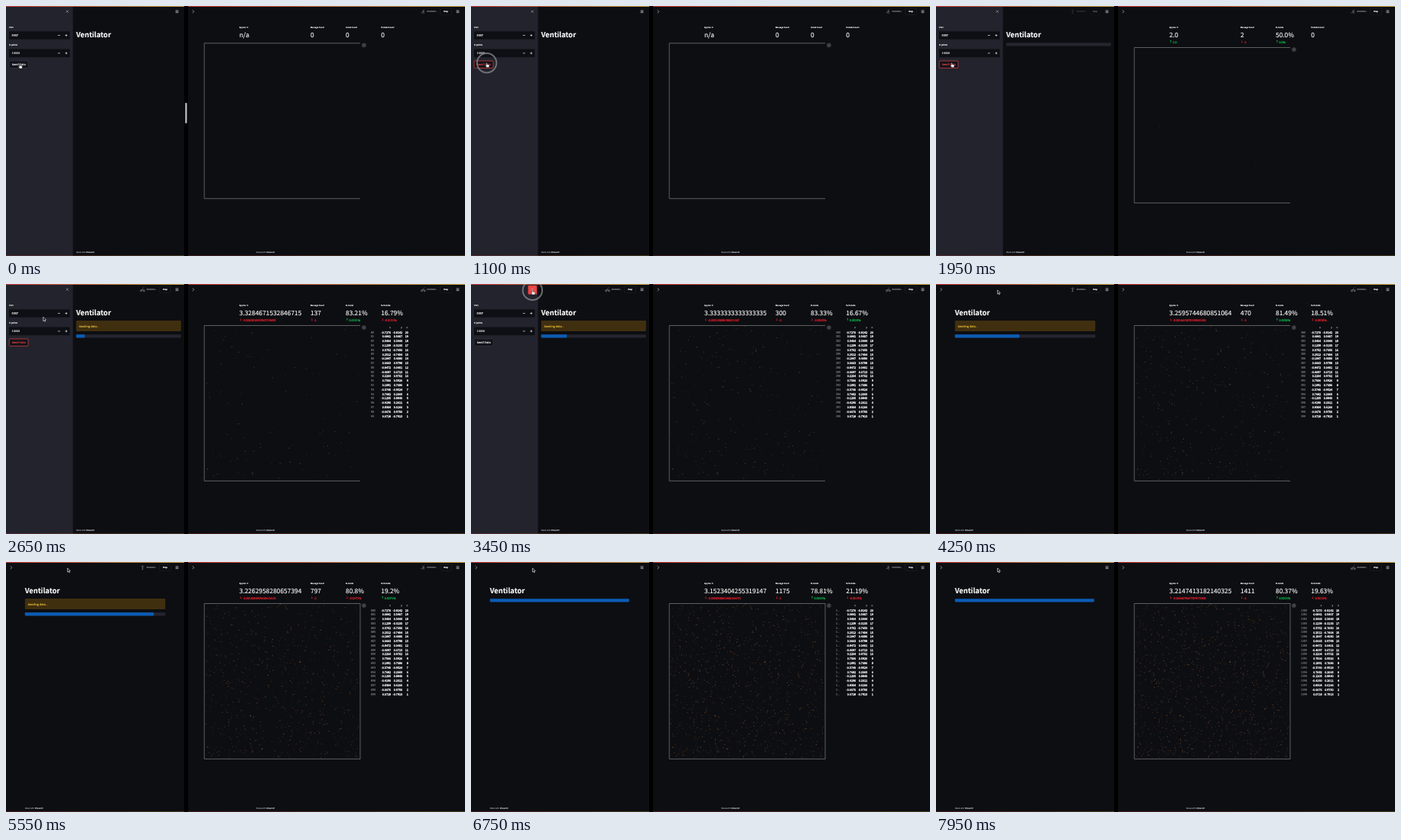
These frames come from a looping animation (600x328 px, 8000 ms). An HTML page with a canvas:

```html
<!DOCTYPE html>
<html lang="en">
<head>
<meta charset="utf-8">
<title>Ventilator</title>
<style>
  html, body { margin: 0; width: 600px; height: 328px; overflow: hidden; background: #0d0e12; }
  svg, canvas { position: absolute; display: block; }
  svg { left: 0; top: 0; }
  canvas { left: 259px; top: 54px; }
  text {
    font-family: "Noto Sans CJK JP", "Noto Sans CJK SC", "Noto Sans CJK", "Noto Sans", sans-serif;
    color: #fafafa; fill: currentColor; stroke: currentColor; stroke-width: .14;
    text-rendering: geometricPrecision; white-space: pre;
  }
  .dim { color: #85868c; }
</style>
</head>
<body>
<svg id="stage" width="600" height="328" viewBox="0 0 600 328">
  <defs>
    <linearGradient id="strip"><stop stop-color="#f04040"/><stop offset="1" stop-color="#e6c552"/></linearGradient>
  </defs>
  <rect width="600" height="328" fill="#0d0e12"/>
  <g id="main"></g>
  <g id="side"><rect width="87.5" height="328" fill="#22232c"/></g>
  <g id="bars"></g>
  <g id="right"></g>
  <g id="top"></g>
</svg>
<canvas id="dots" width="204" height="204"></canvas>
<script>
const LOOP = 8000, TICK = 50;
const $ = id => document.getElementById(id);

function add(parent, tag, attrs) {
  const el = document.createElementNS('http://www.w3.org/2000/svg', tag);
  set(el, attrs);
  return parent.appendChild(el);
}
function set(el, attrs) {
  for (const k in attrs) el.setAttribute(k, attrs[k]);
}
// Text placed by the vertical middle of its capitals
function label(parent, x, mid, size, str, attrs = {}) {
  const el = add(parent, 'text', { x, y: mid + size * .367, 'font-size': size, ...attrs });
  el.textContent = str;
  return el;
}
const line = (parent, d, width = .6, stroke = '#b4b5ba') =>
  add(parent, 'path', { d, fill: 'none', stroke, 'stroke-width': width });
const show = (el, on) => el.setAttribute('opacity', +on);
const clamp = v => Math.max(0, Math.min(1, v));
const span = (t, a, b) => clamp((t - a) / (b - a));
const ease = p => p * p * (3 - 2 * p);

function track(keys, t, col) {
  let i = 1;
  while (i < keys.length - 1 && keys[i][0] < t) i++;
  const a = keys[i - 1], b = keys[i];
  return a[col] + (b[col] - a[col]) * span(t, a[0], b[0]);
}

// time, messages, messages inside the circle
const COUNTS = [[1950, 2, 1], [2000, 4, 3], [3450, 300, 250], [4250, 470, 383], [5500, 791, 638],
  [5550, 797, 644], [6750, 1175, 926], [7050, 1240, 984], [7250, 1260, 1002], [7400, 1310, 1047],
  [7650, 1360, 1090], [7750, 1411, 1134]];
const SENT = [[2250, 0], [3450, .245], [4250, .46], [5550, .918], [5800, .992]];
const PAUSES = [[7050, 7250], [7400, 7650], [7750, LOOP]];

const POSES = [
  'M.6-1.2L-.3.6L.9 1.4L.6 2.9M-.3.6L-1.4 1.7L-2.6 1.4M.6-1.2L-1.3-1M.6-1.2L1.8.2M.9-2.6h.6',
  'M-3 1.5a1.1 1.1 0 1 0 2.2 0a1.1 1.1 0 1 0-2.2 0M.8 1.5a1.1 1.1 0 1 0 2.2 0a1.1 1.1 0 1 0-2.2 0M-1.9 1.5L-.3-.4L1.9 1.5M-.3-.4L1-1.7M1.2-2.7h.6',
  'M0-1.2V1L-.7 3M0 1L.7 3M-2-1.4H2M-.3-2.7h.6'
];

function toolbar(parent, menuX, iconX) {
  const run = add(parent, 'g', {});
  const icon = line(run, '', .55, '#9a9ba0');
  set(icon, { transform: `translate(${iconX} 7.3)` });
  label(run, iconX + 5.2, 7.2, 2.55, 'RUNNING...', { class: 'dim' });
  add(run, 'rect', { x: menuX - 23, y: 2.8, width: 15, height: 8.6, rx: 1, fill: '#0d0e12', stroke: '#2c2d33', 'stroke-width': .4 });
  label(run, menuX - 15.5, 7.1, 2.7, 'Stop', { 'text-anchor': 'middle', 'font-weight': 700 });
  line(parent, `M${menuX - 1.9} 5.9h3.8m-3.8 1.4h3.8m-3.8 1.4h3.8`, .75);
  return { run, icon };
}
function footer(parent, x) {
  const el = label(parent, x, 323.3, 2.55, 'Made with ', { class: 'dim' });
  const name = add(el, 'tspan', { style: 'color:#c4c4c8' });
  name.textContent = 'Streamlit';
}
const chevron = (parent, x) => line(parent, `M${x - .9} 5.3l1.9 2l-1.9 2`, .75);

// Left pane
const main = $('main');
label(main, 0, 37.4, 9.3, 'Ventilator', { 'font-weight': 700 });
const warn = add(main, 'g', {});
const warnBox = add(warn, 'rect', { y: 48, height: 14, rx: 1, fill: '#402f0f' });
label(warn, 3.8, 55.2, 3.75, 'Sending data...', { style: 'color:#e6bd3c' });
const rail = add(main, 'rect', { height: 4.2, rx: .8, fill: '#24252e' });
const fill = add(main, 'rect', { height: 4.2, rx: .8, fill: '#0b5cb5' });
footer(main, 0);

// Sidebar
const side = $('side');
const closeBox = add(side, 'rect', { x: 74.6, y: 2, width: 11.4, height: 11.6, rx: 1.2, fill: '#ee4444' });
line(side, 'M78.7 5.7l3 3m0-3l-3 3');
[['Port', '5557', 28], ['N points', '10000', 51.4]].forEach(([name, value, y]) => {
  label(side, 4, y, 2.8, name);
  add(side, 'rect', { x: 4, y: y + 5.2, width: 79.4, height: 10.6, rx: 1, fill: '#0e0f14' });
  label(side, 7.6, y + 10.6, 3.75, value);
  line(side, `M67.8 ${y + 10.5}h2.8M77.4 ${y + 10.5}h2.8m-1.4-1.4v2.8`, .75, '#e4e4e6');
});
const button = add(side, 'rect', { x: 4.2, y: 72, width: 24.8, height: 9.4, rx: 1, fill: '#12131a', 'stroke-width': .7 });
const send = label(side, 16.6, 76.7, 3.75, 'Send Data', { 'text-anchor': 'middle' });

// Window chrome
const bars = $('bars');
const opener = chevron(bars, 6.7);
const leftBar = toolbar(bars, 223.5, 178.5);
add(bars, 'rect', { x: 233, width: 5, height: 328, fill: '#000' });
const grip = add(bars, 'rect', { x: 234.2, y: 127, width: 2.4, height: 27, rx: 1.2, fill: '#b8b8ba' });
[[0, 233], [238, 362]].forEach(([x, width]) => {
  add(bars, 'rect', { x, width, height: 1, fill: 'url(#strip)', opacity: .85 });
  add(bars, 'rect', { x, y: 327, width, height: 1, fill: 'url(#strip)', opacity: .25 });
});

// Right pane
const right = $('right');
chevron(right, 244.7);
const rightBar = toolbar(right, 590.5, 545.4);
footer(right, 327.3);
const metrics = [305, 398, 444, 490.3].map(x => ({
  name: label(right, x, 28.1, 2.55, ''),
  value: label(right, x, 37.8, 8.4, ''),
  arrow: label(right, x + .3, 47.2, 3.4, ''),
  delta: label(right, x + 4.4, 47.2, 3.7, '')
}));
const plot = add(right, 'g', {});
line(plot, 'M463 54.5H259.2V258.4H463', .75, '#77787a');
const edge = line(plot, 'M463 54.2V258.7', .75, '#77787a');
add(plot, 'circle', { cx: 467.9, cy: 57.1, r: 2.9, fill: '#3a3b40' });
line(plot, 'M466.8 58.2l2.2-2.2', .4, '#77787c');

const ROWS = `-0.7270 -0.8142,0.6841 0.5407,0.3464 0.3444,0.1239 -0.3133,0.3752 -0.7650,0.2512 -0.7404,
-0.1847 0.4080,0.0663 0.9798,-0.8472 0.0401,-0.4097 0.0713,0.2204 0.9702,0.7506 0.5926,0.1891 0.7686,
-0.3740 -0.9524,0.7682 0.2065,-0.1205 0.8840,-0.4190 0.2011,0.8304 0.6166,-0.6676 0.9750,0.0718 -0.7913`
  .split(',').map(r => r.trim().split(' '));
const table = add(right, 'g', {});
const cells = add(table, 'g', { 'stroke-width': .3 });
const end = { 'text-anchor': 'end', style: 'stroke-width:.26' };
const COLS = [503.2, 518.2, 525.8];
['x', 'y', 'n'].forEach((c, i) => label(cells, COLS[i] - .4, 57.3, 3, c, { ...end, class: 'dim' }));
const ids = ROWS.map((row, i) => {
  const y = 63.2 + i * 5.79;
  [...row, 20 - i].forEach((v, c) => label(cells, COLS[c], y, 3.75, v, end));
  return label(table, 477, y, 3.6, '', { class: 'dim' });
});

// Pointer
const ring = add($('top'), 'circle', { fill: 'none', stroke: '#8a8b90', 'stroke-width': 2 });
const pointer = add($('top'), 'g', {});
const ink = { stroke: '#fff', 'stroke-width': .6, 'stroke-linejoin': 'round' };
const arrow = add(pointer, 'path', { ...ink, d: 'M0 0V5.2L1.2 4.1L2 6L2.9 5.6L2.1 3.8H3.7Z', fill: '#000' });
const hand = add(pointer, 'path', { ...ink, stroke: '#111', 'stroke-width': .35, fill: '#fff',
  d: 'M-.5.4Q0-.4.5.4V2.2L3 2.8Q3.4 3 3.3 3.8L2.8 6H-.1L-1.9 3.6Q-1.6 2.9-.5 3.6Z' });

// Random points, uniform over the square
let seed = 20211;
const rand = () => (seed = (seed * 16807) % 2147483647) / 2147483647;
const points = Array.from({ length: 1411 }, () => [rand(), rand(), rand()]);
const ctx = $('dots').getContext('2d');

function drawDots(n) {
  ctx.clearRect(0, 0, 204, 204);
  const warm = span(n, 250, 800);
  for (const [x, y, k] of points.slice(0, n)) {
    const inside = Math.hypot(x - .5, y - .5) < .5;
    ctx.fillStyle = `hsl(28 ${8 + 42 * warm}% ${30 + 12 * k}%)`;
    ctx.globalAlpha = (.28 + .6 * k * k) * (inside ? 1 : .75);
    ctx.fillRect(1 + x * 202, 1 + y * 202, .95, .95);
  }
}

const decimal = v => Number.isInteger(v) ? v + '.0' : String(v);
const percent = v => decimal(+v.toFixed(2)) + '%';

function setMetric(i, name, value, delta) {
  const m = metrics[i], down = String(delta).startsWith('-');
  m.name.textContent = name;
  m.value.textContent = value;
  m.arrow.textContent = delta ? (down ? '↓' : '↑') : '';
  m.delta.textContent = delta || '';
  const style = 'stroke-width:.2;color:' + (down ? '#f0202c' : '#0cc24e');
  set(m.arrow, { style });
  set(m.delta, { style });
}

function drawRight(t) {
  const pause = PAUSES.find(p => t >= p[0] && t < p[1]);
  const tick = Math.floor((pause ? pause[0] : t) / TICK), now = tick * TICK;
  const started = now >= 1850, both = now >= 2000;
  const count = Math.round(track(COUNTS, now, 1)), inside = Math.round(track(COUNTS, now, 2));
  const n = started ? count : 0;

  if (!started) {
    ['Approx. π', 'Message Count', 'Inside Count', 'Outside Count']
      .forEach((name, i) => setMetric(i, name, i ? '0' : 'n/a'));
  } else {
    // The first figure sometimes trails by one update
    const late = tick % 37 ? now : now - TICK;
    const pi = 4 * Math.round(track(COUNTS, late, 2)) / Math.round(track(COUNTS, late, 1));
    const drop = [3, 6].includes(tick % 7);
    const step = (drop ? 12 / n + .012 : 1.8 / n).toFixed(4) + '%';
    const share = 100 * inside / n;
    setMetric(0, 'Approx. π', decimal(pi), both ? String(-(drop ? 1.6 : .8) / n * (1 + .2 * Math.sin(tick))) : '2.0');
    setMetric(1, 'Message Count', n, drop && both ? '-2' : '-1');
    setMetric(2, '% Inside', percent(share), both ? (drop ? '-' : '') + step : '0.0%');
    if (both) setMetric(3, '% Outside', percent(100 - share), (drop ? '' : '-') + step);
    else setMetric(3, 'Outside Count', '0');
  }
  set(plot, { transform: `translate(0 ${started ? 0 : -5.7})` });
  show(edge, t >= 4600);

  const first = Math.min(Math.floor(n / 100) * 100, 1300) - 20;
  const tight = first >= 980 && first < 1280;
  show(table, n >= 100);
  set(cells, { transform: `translate(${first >= 1280 ? 1.4 : 0} 0)` });
  ids.forEach((el, i) => el.textContent = tight ? '1...' : first + i);
  drawDots(n);
}

function drawLeft(t) {
  const width = 87.5 * (1 - ease(span(t, 3550, 3850)));
  const pad = Math.max(4.2, (233 - width - 183.5) / 2), inner = 233 - width - 2 * pad;
  set(side, { transform: `translate(${width - 87.5} 0)` });
  set(main, { transform: `translate(${width + pad} 0)` });
  show(opener, t >= 3850);

  const sending = t >= 2050 && t < 5900, y = sending ? 66.2 : 48.2;
  show(warn, sending);
  set(warnBox, { width: inner });
  set(rail, { y, width: inner });
  set(fill, { y, width: inner * track(SENT, t, 1) });
  show(rail, t >= 1800 && t < 5900);
  show(fill, t >= 2250);

  const hot = t >= 300 && t < 3300;
  set(button, { stroke: hot ? '#e84343' : '#34353e' });
  set(send, { style: 'color:' + (hot ? '#e84343' : '#fafafa') });
  show(closeBox, t >= 3250);
  show(leftBar.run, span(t, 1850, 2150) * (1 - span(t, 5900, 6050)));
  show(grip, 1 - span(t, 300, 800));
}

function drawPointer(t) {
  const a = ease(span(t, 300, 1000)), b = ease(span(t, 2100, 3250));
  const x = 18 + 2.6 * a + 59.8 * b, y = 76 - 1.5 * a - 66.6 * b;
  set(pointer, { transform: `translate(${x} ${y})` });
  const over = t < 2330 || (t > 3050 && t < 3600);
  show(hand, over);
  show(arrow, !over);

  const click = [950, 3300].find(c => t >= c && t < c + 350);
  const p = click ? span(t, click, click + 350) : 0;
  set(ring, { cx: x, cy: y + .3, r: 9.5 + 3.2 * Math.min(1, p * 3) });
  show(ring, click ? .75 * (1 - span(p, .5, 1)) : 0);
}

function frame() {
  const t = performance.now() % LOOP, beat = Math.floor(t / 150) % 6;
  leftBar.icon.setAttribute('d', POSES[[0, 2, 0, 0, 2, 1][beat]]);
  rightBar.icon.setAttribute('d', POSES[[0, 0, 2, 0, 1, 1][beat]]);
  drawLeft(t);
  drawRight(t);
  drawPointer(t);
  requestAnimationFrame(frame);
}
frame();
</script>
</body>
</html>
```
